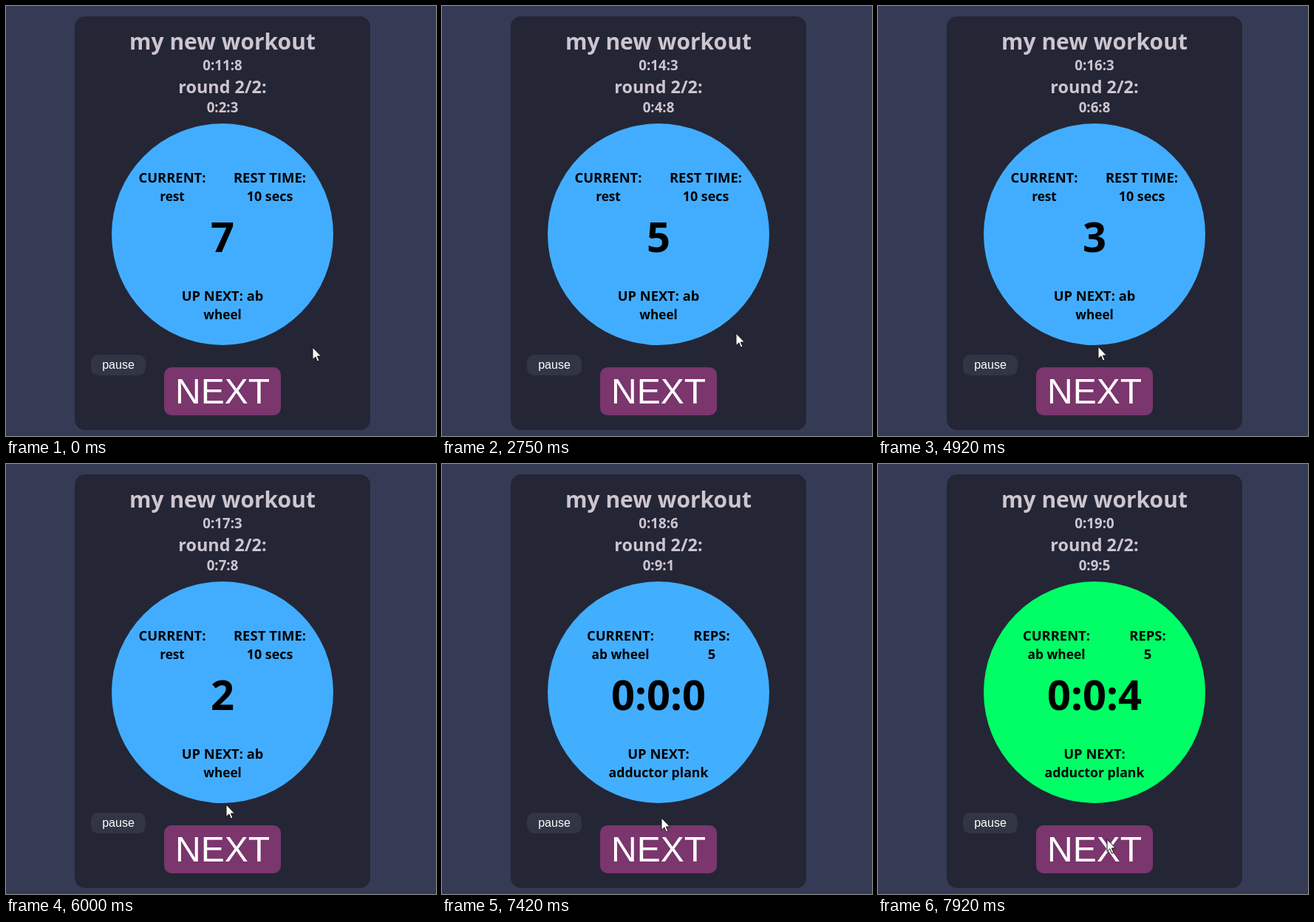
An HTML page for the animation above (8 s loop, 582 by 582 pixels).

```html
<!DOCTYPE html>
<html lang="en">
<head>
<meta charset="utf-8">
<title>Workout timer</title>
<style>
  html, body { margin: 0; width: 100%; height: 100%; overflow: hidden; background: #363b55; }
  svg { display: block; width: 100%; height: 100%; }
  text { text-anchor: middle; font-family: "Open Sans", "Noto Sans", sans-serif; font-weight: 700; }
  .head { fill: #cdc5cf; }
  .button { fill: #fff; font-family: "Liberation Sans", Arial, sans-serif; font-weight: 400; }
</style>
</head>
<body>
<svg viewBox="0 0 582 582">
  <rect x="93" y="14" width="400" height="560" rx="14" fill="#242635"/>
  <g class="head">
    <text x="293" y="59" font-size="30">my new workout</text>
    <text id="total" x="293" y="87" font-size="18.7"></text>
    <text x="293" y="118" font-size="23.4">round 2/2:</text>
    <text id="round" x="293" y="144" font-size="18.7"></text>
  </g>
  <circle id="dial" cx="293" cy="309" r="150"/>
  <text id="count" x="293" y="333" font-size="56"></text>
  <g id="rest">
    <text x="225" y="239" font-size="18.4">CURRENT:</text>
    <text x="225" y="264" font-size="17.2">rest</text>
    <text x="357" y="239" font-size="18.5">REST TIME:</text>
    <text x="357" y="264" font-size="17.9">10 secs</text>
    <text x="293" y="399" font-size="18.3">UP NEXT: ab</text>
    <text x="293" y="424" font-size="17.2">wheel</text>
  </g>
  <g id="exercise">
    <text x="241.5" y="239" font-size="18.4">CURRENT:</text>
    <text x="241.5" y="264" font-size="17.4">ab wheel</text>
    <text x="365" y="239" font-size="18.4">REPS:</text>
    <text x="365" y="264" font-size="18.4">5</text>
    <text x="293" y="399" font-size="18.4">UP NEXT:</text>
    <text x="293" y="424" font-size="17.7">adductor plank</text>
  </g>
  <rect x="115" y="472" width="74" height="28" rx="10" fill="#323543"/>
  <text class="button" x="152" y="491" font-size="16">pause</text>
  <rect x="214" y="489" width="158" height="65" rx="10" fill="#7a366d"/>
  <text class="button" x="293" y="538" font-size="48">NEXT</text>
  <path id="cursor" d="M0 0V16.5L3.9 12.9L6.4 19L9 17.9L6.4 12H11.5Z" fill="#fff" stroke="#111" stroke-width="1"/>
</svg>
<script>
  const LOOP = 8000, TICK = 109, FADE = 400;
  const TOTAL_START = 118, ROUND_START = 23, REST_END = 91;
  const TICK_OFFSET = 0.1;
  const REST_END_MS = (REST_END - ROUND_START - TICK_OFFSET) * TICK;
  const BLUE = [66, 173, 255], GREEN = [0, 255, 102];

  // Cursor stops: time, x, y
  const STOPS = [
    [0, 415, 462], [500, 415, 462], [830, 413, 445], [1250, 400, 422],
    [2540, 400, 422], [2720, 398, 443], [2900, 398, 443],
    [3420, 346, 476], [3750, 298, 461], [6800, 298, 461],
    [7350, 297, 479], [7550, 297, 479], [7880, 310, 508]
  ];

  const el = id => document.getElementById(id);
  const lerp = (a, b, p) => a + (b - a) * p;
  const ease = p => p * p * (3 - 2 * p);
  const clamp = p => Math.min(1, Math.max(0, p));
  const clock = tenths =>
    `${Math.floor(tenths / 600)}:${Math.floor(tenths / 10) % 60}:${tenths % 10}`;

  function cursorAt(time) {
    const next = STOPS.findIndex(stop => stop[0] > time);
    if (next < 0) return STOPS[STOPS.length - 1].slice(1);
    const [t0, x0, y0] = STOPS[next - 1], [t1, x1, y1] = STOPS[next];
    const p = ease((time - t0) / (t1 - t0));
    return [lerp(x0, x1, p), lerp(y0, y1, p)];
  }

  function draw(time) {
    const ticks = Math.floor(time / TICK + TICK_OFFSET);
    const round = ROUND_START + ticks;
    const resting = round < REST_END;

    el("total").textContent = clock(TOTAL_START + ticks);
    el("round").textContent = clock(round);
    el("count").textContent = resting
      ? Math.ceil((REST_END - round) / 10)
      : clock(round - REST_END);
    el("rest").style.display = resting ? "" : "none";
    el("exercise").style.display = resting ? "none" : "";

    const fade = ease(clamp((time - REST_END_MS) / FADE));
    const color = BLUE.map((c, i) => Math.round(lerp(c, GREEN[i], fade)));
    el("dial").setAttribute("fill", `rgb(${color})`);
    el("cursor").setAttribute("transform", `translate(${cursorAt(time)})`);
  }

  const start = performance.now();
  function frame() {
    draw((performance.now() - start) % LOOP);
    requestAnimationFrame(frame);
  }
  frame();
</script>
</body>
</html>
```
